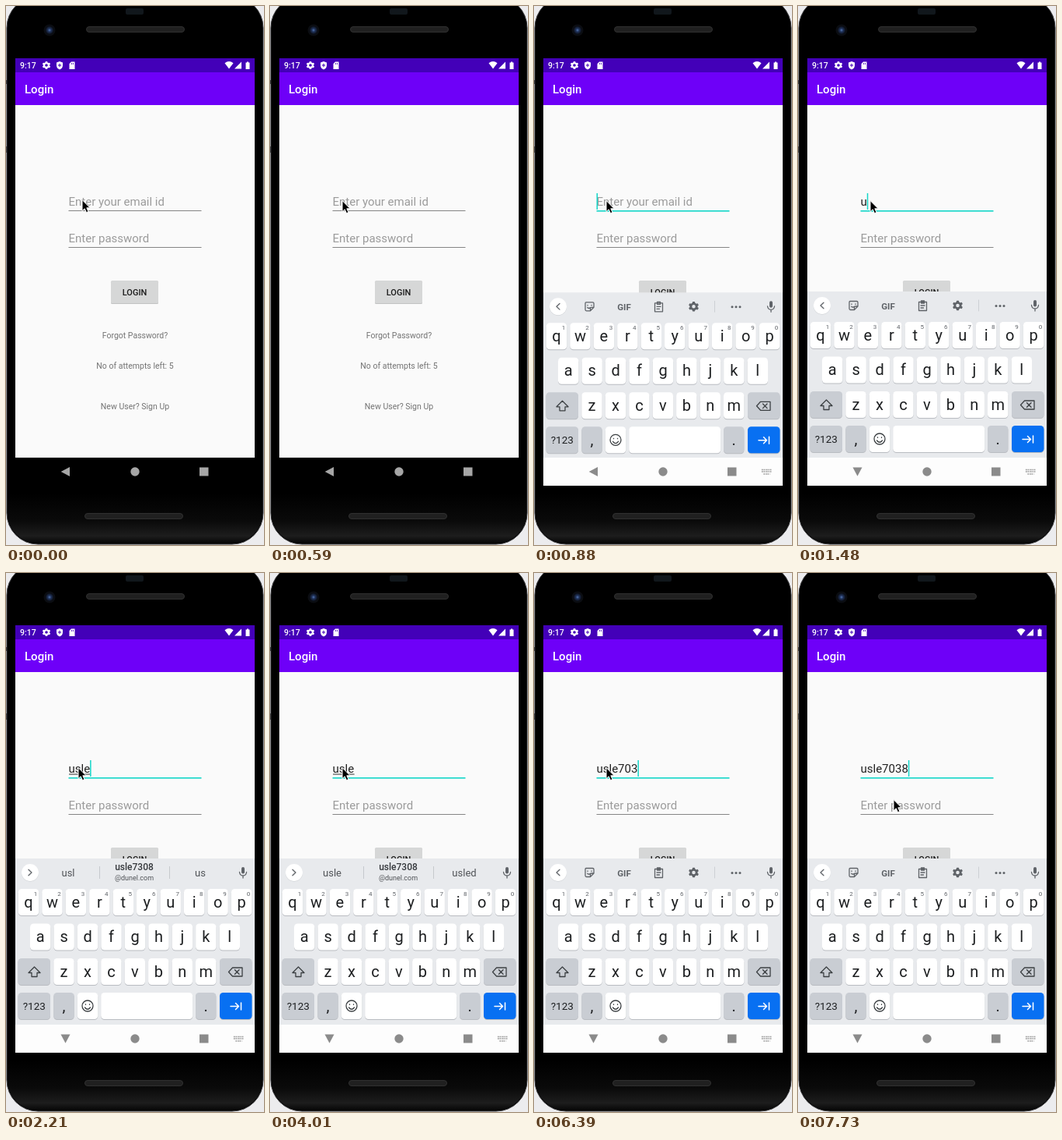
Animation of 332 by 691 pixels, one loop 8 s. Source, as an HTML page:

```html
<!DOCTYPE html>
<html lang="en">
<head>
<meta charset="utf-8">
<title>Login form</title>
<style>
html, body { margin: 0; width: 100%; height: 100%; overflow: hidden; background: #ececee; }
svg { display: block; width: 332px; height: 691px; font-family: Roboto, "Noto Sans", sans-serif; }
text { white-space: pre; }
.m { font-weight: 500; }
.c { text-anchor: middle; }
.line { fill: none; stroke: #5f6368; stroke-width: 1.3; stroke-linecap: round; stroke-linejoin: round; }
</style>
</head>
<body>
<svg id="stage" viewBox="0 0 332 691">
  <defs>
    <linearGradient id="chin" x1="0" y1="0" x2="0" y2="1">
      <stop offset="0" stop-color="#000"/><stop offset=".55" stop-color="#0a0a0a"/>
      <stop offset=".85" stop-color="#1d1d1d"/><stop offset="1" stop-color="#060606"/>
    </linearGradient>
    <radialGradient id="lens">
      <stop offset="0" stop-color="#5578b4"/><stop offset=".4" stop-color="#22355e"/><stop offset="1" stop-color="#0b101c"/>
    </radialGradient>
    <clipPath id="screen"><rect x="12" y="67" width="308" height="548"/></clipPath>
    <path id="gear" d="M-1.2-5.6H1.2L1.7-4A4.4 4.4 0 0 1 3-3.2L4.6-3.7 5.7-1.7 4.5-.6V.6L5.7 1.7 4.6 3.7 3 3.2A4.4 4.4 0 0 1 1.7 4L1.2 5.6H-1.2L-1.7 4A4.4 4.4 0 0 1-3 3.2L-4.6 3.7-5.7 1.7-4.5 .6V-.6L-5.7-1.7-4.6-3.7-3-3.2A4.4 4.4 0 0 1-1.7-4ZM0-2A2 2 0 1 0 0 2 2 2 0 1 0 0-2Z" fill-rule="evenodd"/>
  </defs>

  <!-- phone body -->
  <rect x="0" y="95" width="3" height="5" fill="#444"/>
  <rect x="0" y="180" width="3" height="8" fill="#555"/>
  <rect x="1" y="-12" width="330" height="702" rx="40" fill="#000" stroke="#3c3c3e"/>
  <path d="M2 625H330V650A39 39 0 0 1 291 689H41A39 39 0 0 1 2 650Z" fill="url(#chin)"/>
  <rect x="154" y="3" width="23" height="8" rx="2" fill="#11171c"/>
  <circle cx="56" cy="31" r="7.5" fill="#0b0d12"/>
  <circle cx="56" cy="31" r="5" fill="url(#lens)"/>
  <g fill="#202020" stroke="#303030">
    <rect x="103.500" y="26.500" width="126" height="7" rx="3.500"/>
    <rect x="101.500" y="650.500" width="126" height="7" rx="3.500"/>
  </g>

  <g clip-path="url(#screen)">
    <rect x="12" y="67" width="308" height="512" fill="#fafafa"/>
    <rect x="12" y="67" width="308" height="18" fill="#4300b8"/>
    <rect x="12" y="85" width="308" height="42" fill="#6e00f8"/>
    <g fill="#fff">
      <text class="m" x="18" y="80" font-size="10.500">9:17</text>
      <use href="#gear" transform="translate(52 76) scale(.9)"/>
      <path d="M69 71L73 72.500V76Q73 80 69 81.500 65 80 65 76V72.500Z"/>
      <path d="M84 71.500H88.500V81H81.500V74Z"/>
      <path d="M281.500 73.200Q287 69 292.500 73.200L287 80.500Z"/>
      <path d="M303 71.500V80.500H294Z"/>
      <path d="M308.500 72.500H310V71.500H312V72.500H313.500V81H308.500Z"/>
      <text class="m" x="24" y="112" font-size="15">Login</text>
    </g>
    <path d="M66.800 76H71.200M69 73.800V78.200" stroke="#4300b8"/>
    <path d="M84.500 73V75M86.500 73V75" stroke="#4300b8" stroke-width=".8"/>

    <!-- form -->
    <g font-size="15">
      <text id="hint" x="80.500" y="256" fill="#9b9b9b">Enter your email id</text>
      <text id="email" x="80.500" y="256" fill="#222"></text>
      <text x="80.500" y="303" fill="#9b9b9b">Enter password</text>
    </g>
    <rect id="compose" x="81" y="257.500" height="1" fill="#333"/>
    <rect id="caret" y="240" width="1.500" height="21" fill="#13d6c8"/>
    <rect id="field" x="80.500" width="171"/>
    <rect x="80.500" y="309" width="171" height="1" fill="#858585"/>
    <rect x="135" y="353" width="61" height="29" rx="1.500" fill="#c2c3c3"/>
    <rect x="135" y="352" width="61" height="29" rx="1.500" fill="#d6d7d7"/>
    <text class="m c" x="165.500" y="370.500" font-size="11" fill="#1c1c1c">LOGIN</text>
    <g class="c" font-size="10.500" fill="#737373">
      <text x="166" y="426">Forgot Password?</text>
      <text x="166" y="465">No of attempts left: 5</text>
      <text x="166" y="517">New User? Sign Up</text>
    </g>

    <rect id="navBg" x="12" y="579" width="308" height="36"/>

    <g id="board">
      <rect x="12" y="366" width="308" height="249" fill="#e8eaed"/>
      <circle cx="31" cy="384.500" r="11" fill="#c9ccd0"/>
      <circle cx="31" cy="384" r="11" fill="#fff"/>
      <path id="chevron" class="line" d="M2-3.800L-2 0 2 3.800"/>
      <g id="tools" class="line">
        <path d="M67 378.500H75.500Q77 378.500 77 380V385L72.500 389.500H67.500Q66 389.500 66 388V380Q66 378.500 67 378.500ZM77 385H74Q72.500 385 72.500 386.500V389.500M69 382V382.600M74 382V382.600M68.800 385.200Q70.500 387 72.200 385.500"/>
        <path d="M156 379.500H165.500V390.500H155.500V379.500ZM158.500 378H162.500V381H158.500ZM158 384H163M158 387H161.500"/>
        <path d="M232.500 377V391" stroke="#cdd0d4" stroke-width="1"/>
        <g fill="#5f6368" stroke="none">
          <text class="c" x="116" y="388.500" font-size="11.500" font-weight="700">GIF</text>
          <use href="#gear" transform="translate(205.500 384) scale(1.120)"/>
          <circle cx="255" cy="384.500" r="1.500"/><circle cx="260" cy="384.500" r="1.500"/><circle cx="265" cy="384.500" r="1.500"/>
        </g>
      </g>
      <g id="words" class="c" font-size="13" fill="#505357">
        <path d="M120.500 376V392M210.500 376V392" stroke="#c6c9cd"/>
        <text id="left" x="80" y="388.500"></text>
        <text id="mid" class="m" x="165" fill="#36393d"></text>
        <text id="domain" x="165" y="394" font-size="9">@dunel.com</text>
        <text id="right" x="250" y="388.500"></text>
      </g>
      <rect x="303" y="377" width="4" height="8.500" rx="2" fill="#5f6368"/>
      <path class="line" d="M300.500 383.500Q301 388 305 388T309.500 383.500M305 388V391"/>
      <g id="keys"></g>
      <g class="line" style="stroke:#3c4043">
        <path d="M36.500 505L44 512.500H40V517.500H33V512.500H29Z"/>
        <path d="M291.500 506H304V517H291.500L286.500 511.500ZM294.500 508.700L300 514.300M300 508.700L294.500 514.300"/>
        <circle cx="105" cy="555" r="7"/>
        <path d="M101.500 557Q105 561.500 108.500 557M102.500 553V553.400M107.500 553V553.400"/>
        <path d="M289 555.500H299M295.500 551.500L299.500 555.500 295.500 559.500M302.500 551V560" style="stroke:#fff;stroke-width:1.500"/>
      </g>
    </g>

    <g id="nav">
      <path id="back" d="M-5.800 0L5.500-6V6Z"/>
      <circle cx="166" cy="597" r="5.700"/>
      <rect x="249" y="591.500" width="11.500" height="11"/>
      <path id="switcher" d="M293 594.500H306M293 597H306M295.500 600H303.500" stroke-width="1.500" stroke-dasharray="1.500 1"/>
    </g>
  </g>

  <path id="mouse" d="M0 0V14.200L3.200 11.200 5.500 16.200 8 15.100 5.800 10.300H10.200Z" fill="#000" stroke="#fff"/>
</svg>
<script>
const $ = id => document.getElementById(id);
const NS = "http://www.w3.org/2000/svg";
const LOOP = 8000;

function add(tag, attrs, text = "") {
  const el = document.createElementNS(NS, tag);
  for (const k in attrs) el.setAttribute(k, attrs[k]);
  el.textContent = text;
  $("keys").append(el);
}

function key(x, w, cy, label = "", fill = "#fff", size = 20) {
  add("rect", { x, y: cy - 16, width: w, height: 34, rx: 4.5, fill: "#b9bcc1" });
  add("rect", { x, y: cy - 17, width: w, height: 34, rx: 4.5, fill });
  const drop = size < 20 ? 5 : 6.5;
  add("text", { x: x + w / 2, y: cy + drop, class: "c", "font-size": size, fill: "#1d1f21" }, label);
}

const PITCH = 30.45, GREY = "#c9cdd3";
[["qwertyuiop", 29, 422], ["asdfghjkl", 44.2, 466.5], ["zxcvbnm", 74.5, 511]].forEach(([row, x0, cy], r) => {
  [...row].forEach((ch, i) => {
    const x = x0 + i * PITCH;
    key(x - 13.2, 26.4, cy, ch);
    if (r === 0) add("text", { x: x + 9, y: cy - 8, class: "c", "font-size": 8, fill: "#5f6368" }, (i + 1) % 10);
  });
});
key(15.5, 41.5, 511, "", GREY);
key(275, 41.5, 511, "", GREY);
key(15.5, 41.5, 555, "?123", GREY, 13.5);
key(61.3, 26.4, 555, ",", GREY);
key(91.8, 26.4, 555);
key(122.2, 118, 555);
key(244, 26.4, 555, ".", GREY);
key(275, 41.5, 555, "", "#0870f2");

const start = {
  mouse: [98, 248.5], focus: 0, caret: 0, text: "", compose: 0, words: null,
  mail: 0, board: null, navDark: 1, turn: 0
};

// Each step overrides part of the state from its time on.
const steps = [
  [150, { mouse: [95, 249] }],
  [300, { mouse: [93, 249.5] }],
  [600, { focus: 1, caret: 1 }],
  [740, { board: [181, .18] }],
  [880, { board: [1.3, 1], navDark: 0 }],
  [1030, { board: [0, 1], turn: -45 }],
  [1180, { turn: -90 }],
  [1480, { text: "u" }],
  [1620, { words: ["u", "up", "us"], compose: 1 }],
  [1770, { text: "us" }],
  [1910, { text: "usl", words: ["us", "use", "used"], compose: 2 }],
  [2210, { text: "usle", words: ["usl", "usle7308", "us"], mail: 1, compose: 4 }],
  [2510, { words: ["usle", "usle7308", "usled"] }],
  [2960, { caret: 0 }],
  [3410, { caret: 1 }],
  [4010, { caret: 0 }],
  [4450, { text: "usle7", caret: 1 }],
  [4750, { words: ["usle7", "usle7308", "usle"], compose: 5 }],
  [5200, { caret: 0 }],
  [5350, { text: "usle70", caret: 1 }],
  [5490, { words: ["usle70", "usle7308", "usle"], compose: 6 }],
  [5940, { caret: 0 }],
  [6090, { text: "usle703", caret: 1 }],
  [6390, { words: null, compose: 0 }],
  [6540, { text: "usle7038" }],
  [6990, { caret: 0 }],
  [7140, { mouse: [97, 257] }],
  [7290, { mouse: [107, 270] }],
  [7440, { mouse: [117, 283], caret: 1 }],
  [7580, { mouse: [122, 289] }],
  [7730, { mouse: [123, 290.5] }]
];

const set = (id, attrs) => { for (const k in attrs) $(id).setAttribute(k, attrs[k]); };
const show = (id, on) => { $(id).style.display = on ? "" : "none"; };
const pen = document.createElement("canvas").getContext("2d");
function width(str) {
  pen.font = '15px Roboto, "Noto Sans", sans-serif';
  return pen.measureText(str).width;
}

function draw(s) {
  set("mouse", { transform: `translate(${s.mouse})` });
  show("hint", !s.text);
  $("email").textContent = s.text;
  set("compose", { width: width(s.text.slice(0, s.compose)) });
  show("caret", s.caret);
  set("caret", { x: 80.5 + width(s.text) });
  set("field", s.focus ? { y: 262, height: 1.6, fill: "#13d6c8" } : { y: 262, height: 1, fill: "#858585" });

  show("board", s.board);
  if (s.board) set("board", { transform: `translate(0 ${s.board[0]})`, opacity: s.board[1] });
  set("navBg", { fill: s.navDark ? "#000" : "#fdfdfd" });
  if (s.board && !s.navDark) $("nav").before($("navBg"));
  else $("board").before($("navBg"));
  const tone = s.navDark ? "#a6a6a6" : "#8b8b8b";
  set("nav", { fill: tone });
  set("switcher", { stroke: tone });
  show("switcher", s.board);
  set("back", { transform: `translate(76.5 597) rotate(${s.turn})` });

  show("tools", !s.words);
  show("words", s.words);
  set("chevron", { transform: `translate(31 384) scale(${s.words ? -1 : 1} 1)` });
  if (s.words) ["left", "mid", "right"].forEach((id, i) => { $(id).textContent = s.words[i]; });
  set("mid", s.mail ? { y: 380.5, "font-size": 12 } : { y: 388.5, "font-size": 13 });
  show("domain", s.mail);
}

let shown = -1;
function frame() {
  const t = performance.now() % LOOP;
  const n = steps.filter(([at]) => at <= t).length;
  if (n !== shown) {
    draw(Object.assign({}, start, ...steps.slice(0, n).map(step => step[1])));
    shown = n;
  }
  requestAnimationFrame(frame);
}
frame();
</script>
</body>
</html>
```
